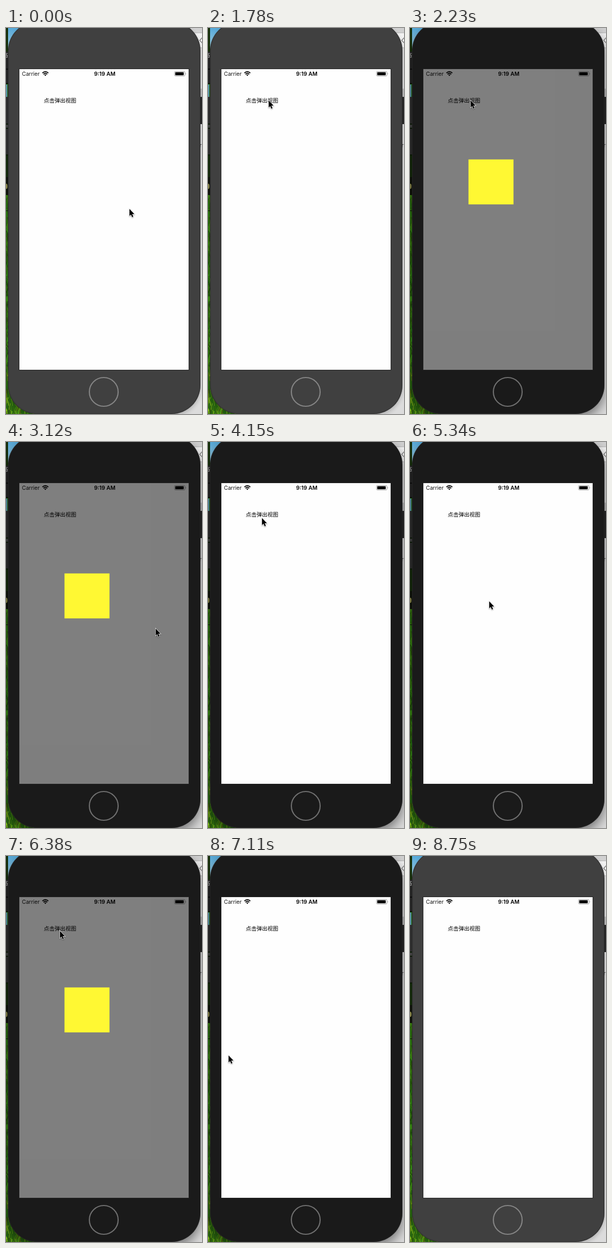
These frames come from a looping animation (381x751 px, 8.81 s). An HTML page with a canvas:

```html
<!DOCTYPE html>
<html lang="zh-CN">
<head>
<meta charset="utf-8">
<title>点击弹出视图</title>
<style>
  html, body { margin: 0; width: 100%; height: 100%; overflow: hidden; background: #d9d9d9; }
  canvas, svg, .phone { position: absolute; left: 0; top: 0; display: block; }
  text { font-family: Inter, Roboto, "Liberation Sans", sans-serif; }
  .cjk { font-family: "Noto Sans CJK SC", "Noto Sans CJK", sans-serif; }

  .phone {
    left: 4px; top: -12px; width: 374px; height: 763px; border-radius: 56px;
    animation: focus 8810ms step-end infinite;
  }
  .home { animation: ring 8810ms step-end infinite; }
  .popup { animation: popup 8810ms step-end infinite; }
  .cursor {
    overflow: visible; filter: drop-shadow(0 1px 1px rgba(0,0,0,.4));
    animation: move 8810ms linear infinite;
  }

  @keyframes focus {
    0%, 99.318% {
      background: #404040;
      box-shadow: inset 0 0 1.5px 1px rgba(0,0,0,.3), 0 4px 9px rgba(0,0,0,.2);
    }
    25.312% {
      background: #1a1a1a;
      box-shadow: inset 0 0 1.5px 1px rgba(70,70,70,.3), 0 10px 22px rgba(0,0,0,.48);
    }
  }
  @keyframes ring {
    0%, 99.318% { stroke: #858585; }
    25.312% { stroke: #707070; }
  }
  @keyframes popup {
    0%, 38.819%, 60.612%, 80.703% { opacity: 0; }
    25.312%, 50.511%, 72.417% { opacity: 1; }
    100% { opacity: 0; }
  }
  @keyframes move {
    0% { transform: translate(240px, 352px); }
    4.994% { transform: translate(240px, 352px); animation-timing-function: steps(5, start); }
    13.507% { transform: translate(214px, 204px); }
    15.209% { transform: translate(214px, 204px); animation-timing-function: steps(3, start); }
    20.203% { transform: translate(134px, 137px); animation-timing-function: steps(1, start); }
    25.312% { transform: translate(118px, 141px); }
    30.419% { transform: translate(118px, 141px); animation-timing-function: steps(4, start); }
    37.079% { transform: translate(291px, 363px); }
    40.476% { transform: translate(291px, 363px); animation-timing-function: steps(5, start); }
    48.763% { transform: translate(105px, 148px); }
    52.184% { transform: translate(105px, 148px); animation-timing-function: steps(4, start); }
    58.881% { transform: translate(154px, 310px); }
    65.72% { transform: translate(154px, 310px); animation-timing-function: steps(3, start); }
    70.658% { transform: translate(105px, 146px); }
    74.085% { transform: translate(105px, 146px); animation-timing-function: steps(3, start); }
    79.079% { transform: translate(40px, 388px); }
    82.371% { transform: translate(40px, 388px); animation-timing-function: steps(7, start); }
    94.06%, 100% { transform: translate(4px, 754px); }
  }
</style>
</head>
<body>
<canvas id="grass" width="70" height="751"></canvas>

<!-- desktop edges around the phone -->
<svg width="381" height="751" viewBox="0 0 381 751">
  <defs>
    <linearGradient id="sky" x2="0" y2="1">
      <stop offset="0" stop-color="#55a8d8"/><stop offset="1" stop-color="#a4d2e6"/>
    </linearGradient>
  </defs>
  <path d="M4 0H60V40H4z" fill="url(#sky)"/>
  <path d="M0 0H4V46H0z" fill="#17300b"/>
  <path d="M0 46H4V108H0z" fill="#262626"/>
  <text class="cjk" x="-6.5" y="57" font-size="10.5" fill="#eee">态</text>
  <path d="M0 80H4M0 108H4M0 187H4M0 195H4M0 247H4" stroke="#050505" stroke-width="1.5"/>
  <path d="M0 110H2.5V134H0z" fill="#5f9fb5"/>
  <path d="M0 134H4V186H0zM0 196H4V246H0z" fill="#303030"/>
  <path d="M0 188H4V194H0z" fill="#444"/>
  <path d="M0 248H4V290H0z" fill="#142b0a"/>
  <path d="M0 290H4V325H0z" fill="#10140b"/>
  <ellipse cx="0.5" cy="308" rx="2.5" ry="5" fill="#8d8a4c"/>
  <path d="M0 355.5H4" stroke="#111"/>

  <path d="M330 0H381V751H330z" fill="#dcdcdc"/>
  <path d="M340 0H381V9H340z" fill="#d0d0d0"/>
  <path d="M340 10H381V38H340z" fill="#f1f1f1"/>
  <path d="M340 9.5H381M340 38.5H381" stroke="#b5b5b5"/>
  <path d="M376 118H381V134H376z" fill="#bdbdbd"/>
  <path d="M376 134H381V187H376z" fill="#262626"/>
</svg>

<div class="phone"></div>

<svg width="381" height="751" viewBox="0 0 381 751">
  <path d="M382 18L376.500 24L382 30" fill="none" stroke="#666" stroke-width="1.2"/>
  <text x="376.500" y="232" font-size="10" fill="#222">r</text>

  <rect x="25" y="79" width="331" height="587" fill="#222"/>
  <rect x="26" y="80" width="329" height="585" fill="#fefefe"/>
  <circle class="home" cx="190" cy="708" r="28" fill="none" stroke-width="2.2"/>

  <text x="31" y="93" font-size="10.5" fill="#111">Carrier</text>
  <g fill="none" stroke="#000" stroke-width="1.9">
    <path d="M70.700 87.600Q76.500 82.300 82.300 87.600"/>
    <path d="M72.900 90Q76.500 86.700 80.100 90"/>
  </g>
  <path d="M74.500 91.200Q76.500 89.600 78.500 91.200L76.500 93.400z"/>
  <text x="192" y="93" font-size="10.6" font-weight="600" text-anchor="middle">9:19 AM</text>
  <rect x="327.500" y="84.500" width="20.500" height="9" rx="2.2" fill="none" stroke="#999"/>
  <rect x="329" y="86" width="16.500" height="6" rx=".8"/>
  <path d="M349.200 87.300Q350.800 89 349.200 90.700z" fill="#888"/>
  <text class="cjk" x="73.500" y="145" font-size="10.5" font-weight="500">点击弹出视图</text>

  <g class="popup">
    <rect x="26" y="80" width="329" height="585" fill="#000" fill-opacity=".5"/>
    <rect x="113.700" y="255.700" width="87.500" height="87.500" fill="#fff833"/>
  </g>
</svg>

<svg class="cursor" width="12" height="19">
  <path d="M0 0V13.600L3 10.900L5.200 16L7.400 15L5.200 10H9.500z"
        fill="#000" stroke="#fff" stroke-width="1.3" paint-order="stroke"/>
</svg>

<script>
  const ctx = document.getElementById('grass').getContext('2d');
  let seed = 7;
  const rnd = () => (seed = seed * 16807 % 2147483647) / 2147483647;

  ctx.fillStyle = '#26650f';
  ctx.fillRect(0, 0, 70, 751);
  for (let i = 0; i < 900; i++) {
    const y = 330 + rnd() * 440;
    const x = rnd() * (y > 660 ? 70 : 8) - 2;
    const lean = (rnd() - .5) * 12;
    const glow = y > 660 ? 16 : 0;
    ctx.strokeStyle = `hsl(${90 + rnd() * 20 - glow}, 75%, ${13 + rnd() * 22 + glow * rnd()}%)`;
    ctx.lineWidth = .7 + rnd() * 1.2;
    ctx.beginPath();
    ctx.moveTo(x, y);
    ctx.quadraticCurveTo(x, y - 8, x + lean, y - 12 - rnd() * 8);
    ctx.stroke();
  }
</script>
</body>
</html>
```
